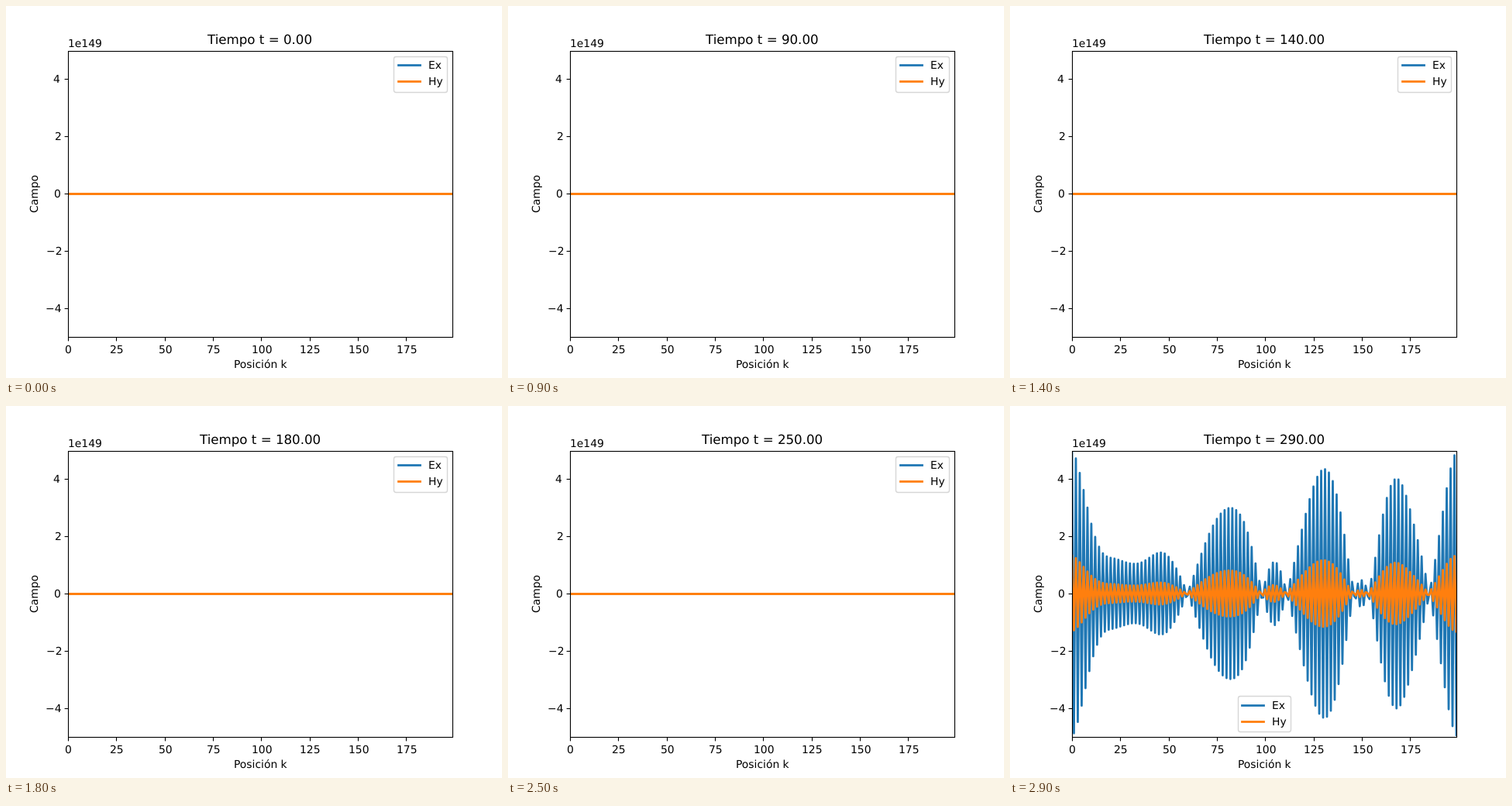
An HTML page with a canvas that plays this animation: 640 px wide and 480 px high, repeating every 3 s.

```html
<!DOCTYPE html>
<html lang="es">
<head>
<meta charset="utf-8">
<style>
html, body { margin: 0; width: 100%; height: 100%; overflow: hidden; background: #fff; }
canvas { display: block; }
</style>
</head>
<body>
<canvas id="plot" width="640" height="480"></canvas>
<script>
const ctx = document.getElementById('plot').getContext('2d');
const BLUE = '#1f77b4', ORANGE = '#ff7f0e';
const LEFT = 80, RIGHT = 576, TOP = 57.6, BOTTOM = 427.2, MIDDLE = 328;
const COUNT = 200, ZERO = 241.95, UNIT = 37.05;
const FRAME_MS = 100, FRAMES = 30;

// Key points of the periodic envelope: position k, signed amplitude
const keys = [
  [0, 4.95], [4, 4.2], [10, 2.43], [16, 1.4], [21, 1.23], [36, 1.08], [48, 1.39],
  [54, 0.87], [59.7, 0], [71, -2.08], [82, -2.98], [91, -2.12], [98.5, 0],
  [105, 1.1], [111.2, 0], [119, -2.22], [131, -4.33], [140, -2.45], [146.3, 0],
  [150, 0.46], [153.3, 0], [160, -2.4], [168, -4], [177, -2.4], [185, 0], [192, 2.85]
];
const N = keys.length;
const next = i => (i + 1) % N, prev = i => (i + N - 1) % N;
const gap = keys.map(([k], i) => (keys[next(i)][0] - k + COUNT) % COUNT);
const rise = keys.map(([, a], i) => (keys[next(i)][1] - a) / gap[i]);

// Relax the slopes until the curve is a smooth periodic cubic spline
const slope = keys.map(() => 0);
for (let pass = 0; pass < 40; pass++) {
  for (let i = 0; i < N; i++) {
    const p = prev(i), wp = 1 / gap[p], wn = 1 / gap[i];
    slope[i] = (wp * (3 * rise[p] - slope[p]) + wn * (3 * rise[i] - slope[next(i)]))
      / (2 * (wp + wn));
  }
}

function amplitude(k) {
  const i = keys.findLastIndex(key => key[0] <= k), j = next(i);
  const h = gap[i], u = (k - keys[i][0]) / h, v = 1 - u;
  return v * v * (1 + 2 * u) * keys[i][1] + u * u * (1 + 2 * v) * keys[j][1]
    + h * u * v * (v * slope[i] - u * slope[j]);
}

const ex = Array.from({ length: COUNT }, (_, k) => (k % 2 ? -1 : 1) * amplitude(k));
const hy = ex.map((e, k) => 0.134 * (e - ex[(k + 1) % COUNT]));

const toX = k => LEFT + k * (RIGHT - LEFT) / (COUNT - 1);
const toY = value => ZERO - value * UNIT;
const snap = p => Math.floor(p + 0.5) + 0.5;

function line(points, color, width) {
  ctx.beginPath();
  points.forEach(([x, y]) => ctx.lineTo(x, y));
  ctx.strokeStyle = color;
  ctx.lineWidth = width;
  ctx.stroke();
}

// Places text by its ink width (align 0 left, 0.5 centre, 1 right) on whole pixels
function text(string, x, y, align = 0.5, size = 13.889) {
  ctx.font = `${size}px "DejaVu Sans", sans-serif`;
  ctx.textRendering = 'geometricPrecision';
  ctx.fillStyle = '#000';
  const { actualBoundingBoxLeft: before, actualBoundingBoxRight: after } = ctx.measureText(string);
  const pen = x - align * (before + after);
  ctx.fillText(string, Math.round(pen - before) + before, y);
}

function drawFields(step) {
  ctx.save();
  ctx.beginPath();
  ctx.rect(LEFT, 58, RIGHT - LEFT, 369);
  ctx.clip();
  ctx.lineJoin = 'round';
  ctx.lineCap = 'square';
  const flatY = step < 28 ? snap(ZERO) : ZERO;
  for (const [field, color] of [[ex, BLUE], [hy, ORANGE]]) {
    const points = step === FRAMES - 1
      ? field.map((value, k) => [toX(k), toY(value)])
      : [[LEFT, flatY], [RIGHT, flatY]];
    line(points, color, 2.78);
  }
  ctx.restore();
}

function drawAxes() {
  ctx.lineCap = 'butt';
  for (let k = 0; k < COUNT - 1; k += 25) {
    const x = snap(toX(k));
    line([[x, 427.5], [x, 432.4]], '#000', 1.11);
    text(String(k), toX(k), 448);
  }
  for (let value = -4; value <= 4; value += 2) {
    const y = snap(toY(value));
    line([[80.5, y], [75.6, y]], '#000', 1.11);
    text(String(value).replace('-', '\u2212'), 70.28, y + 4.5, 1);
  }
  ctx.strokeRect(80.5, snap(TOP), RIGHT - LEFT, snap(BOTTOM) - snap(TOP));
  text('1e149', LEFT, 53, 0);
  text('Posición k', MIDDLE, 467);
  ctx.save();
  ctx.translate(41, 243);
  ctx.rotate(-Math.PI / 2);
  text('Campo', 0, 0);
  ctx.restore();
}

function drawLegend(x, y) {
  const left = snap(x), top = snap(y);
  ctx.beginPath();
  ctx.roundRect(left, top, snap(x + 68.6) - left, snap(y + 46.3) - top, 2.78);
  ctx.fillStyle = 'rgba(255,255,255,.8)';
  ctx.fill();
  ctx.strokeStyle = 'rgba(204,204,204,.8)';
  ctx.lineWidth = 1.39;
  ctx.stroke();
  ctx.lineCap = 'square';
  [['Ex', BLUE], ['Hy', ORANGE]].forEach(([label, color], i) => {
    const rowY = snap(y + 11.7 + 21 * i);
    line([[snap(x + 5.56), rowY], [snap(x + 33.34), rowY]], color, 2.78);
    text(label, x + 44.45, rowY + 4.5, 0);
  });
}

function draw(now) {
  const step = Math.floor(now / FRAME_MS) % FRAMES;
  ctx.fillStyle = '#fff';
  ctx.fillRect(0, 0, 640, 480);
  drawFields(step);
  drawAxes();
  text(`Tiempo t = ${(step * 10).toFixed(2)}`, MIDDLE, 49, 0.5, 16.667);
  if (step === FRAMES - 1) drawLegend(293.7, 373.96);
  else drawLegend(500.46, 64.54);
  requestAnimationFrame(draw);
}
draw(performance.now());
</script>
</body>
</html>
```
